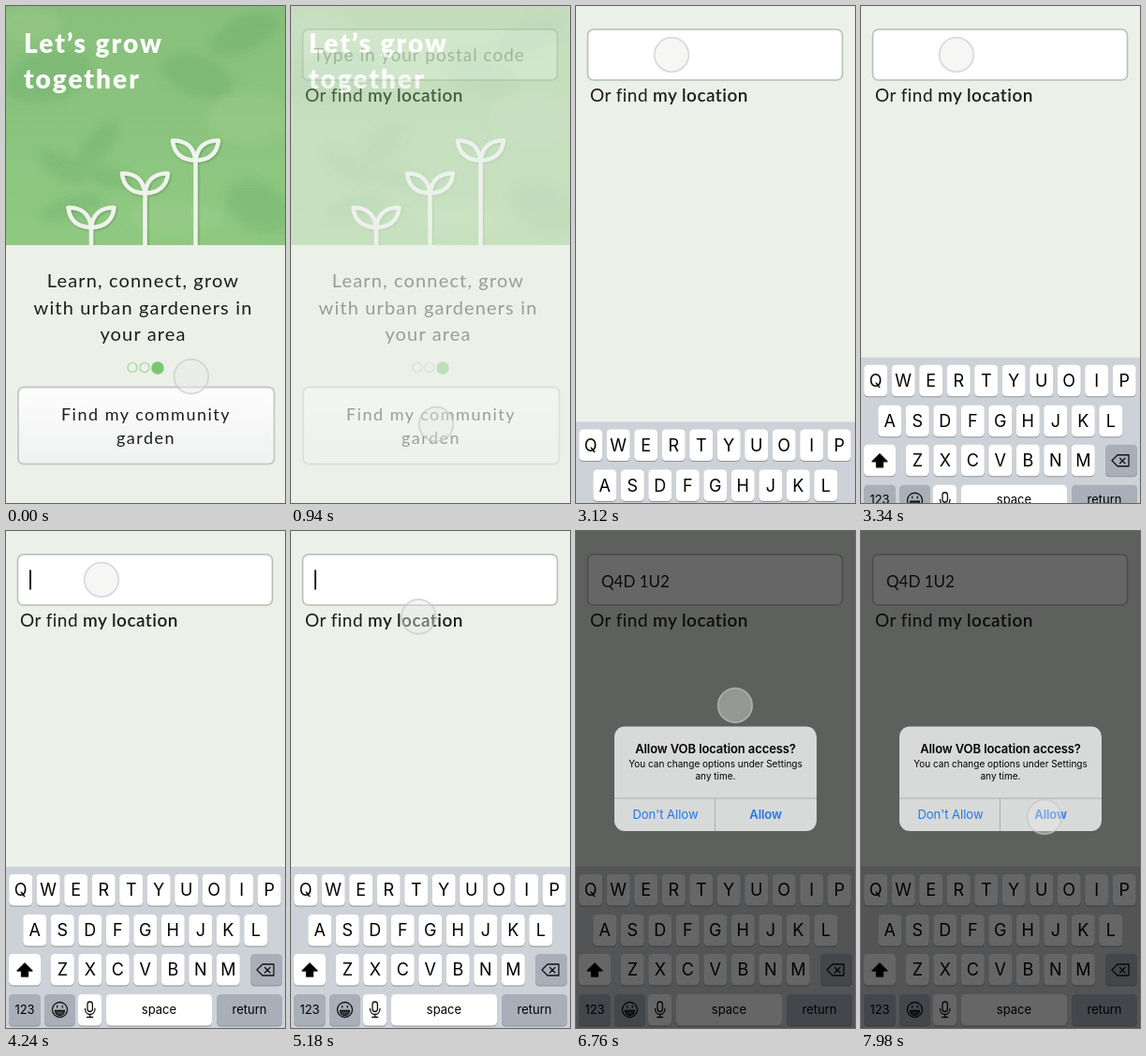
Write an HTML page that moves like this. It is 298 px wide and 530 px high and loops after 8 s.

```html
<!DOCTYPE html>
<html lang="en">
<head>
<meta charset="utf-8">
<title>Community garden finder</title>
<style>
  html, body { margin: 0; width: 100%; height: 100%; overflow: hidden; background: #ebf0e9; }
  svg { display: block; width: 298px; height: 530px; }
  text { font-family: Lato, "Open Sans", sans-serif; fill: #1c1e1c; white-space: pre; }
  .mid { text-anchor: middle; }
  .title { font-size: 28px; font-weight: 900; letter-spacing: 2px; fill: #fff; }
  .lead { font-size: 20px; letter-spacing: 1.15px; }
  .cta { font-size: 18px; letter-spacing: 1.5px; }
  .hint { font-size: 19px; letter-spacing: 1px; fill: #b1b4b1; }
  .find { font-size: 19px; letter-spacing: .45px; }
  .find tspan { font-weight: 600; }
  .code { font-size: 17px; }
  .ui text { font-family: Inter, "Liberation Sans", sans-serif; fill: #000; text-anchor: middle; }
  .key { font-size: 18px; }
  .small { font-size: 13px; }
  .bold { font-size: 13px; font-weight: 600; letter-spacing: -.1px; }
  .note { font-size: 10px; }
  .ui .blue { fill: #1f78ea; }
  .line { fill: none; stroke: #111; stroke-width: 1.3; stroke-linecap: round; stroke-linejoin: round; }
</style>
</head>
<body>
<svg viewBox="0 0 298 530">
  <defs>
    <linearGradient id="green" x2="0" y2="1">
      <stop offset="0" stop-color="#88bf7c"/><stop offset="1" stop-color="#8fc981"/>
    </linearGradient>
    <linearGradient id="button" x2="0" y2="1">
      <stop offset="0" stop-color="#fdfdfd"/><stop offset="1" stop-color="#f0f1f1"/>
    </linearGradient>
    <filter id="soft" x="-30%" y="-30%" width="160%" height="160%"><feGaussianBlur stdDeviation="5"/></filter>
    <filter id="lift" x="-20%" y="-20%" width="140%" height="140%">
      <feDropShadow dx="1" dy="1" stdDeviation="1.2" flood-color="#3c7a38" flood-opacity=".5"/>
    </filter>
    <clipPath id="hero"><path d="M0 0H298V255H0z"/></clipPath>
    <g id="sprout" fill="none" stroke="#eef3ec" stroke-width="4.600" stroke-linejoin="round">
      <path d="M0 0V110"/>
      <path d="M0 0C-2 -15 -10 -21 -24.500 -21C-23 -7 -14 0 0 0C14 0 23 -7 24.500 -21C10 -21 2 -15 0 0z"/>
    </g>
  </defs>

  <g id="search">
    <path d="M0 0H298V530H0z" fill="#ebf0e9"/>
    <rect id="field" x="12.500" y="25" width="272" height="54" rx="6" fill="#fff" stroke-width="1.600"/>
    <text id="hint" class="hint" x="23.500" y="59">Type in your postal code</text>
    <text id="code" class="code" x="27" y="60">Q4D 1U2</text>
    <path id="caret" d="M26 41.500V62.500" stroke="#222" stroke-width="2"/>
    <text class="find" x="15" y="102">Or find <tspan x="82">my location</tspan></text>
    <g id="keyboard" class="ui"><path d="M0 358H298V530H0z" fill="#cdd2d8"/></g>
  </g>

  <g id="welcome">
    <path d="M0 0H298V530H0z" fill="#ebf0e9"/>
    <g clip-path="url(#hero)">
      <path d="M0 0H298V255H0z" fill="url(#green)"/>
      <g id="leaves" filter="url(#soft)"></g>
      <g filter="url(#lift)">
        <use href="#sprout" x="91" y="236"/>
        <use href="#sprout" x="148.500" y="199.500"/>
        <use href="#sprout" x="202.500" y="164.500"/>
      </g>
    </g>
    <text class="title" x="19" y="50">Let’s grow</text>
    <text class="title" x="19" y="88">together</text>
    <g class="lead mid">
      <text x="146.500" y="300">Learn, connect, grow</text>
      <text x="146.500" y="329">with urban gardeners in</text>
      <text x="146.500" y="357">your area</text>
    </g>
    <g fill="none" stroke="#a3d69b" stroke-width="1.200">
      <circle cx="135" cy="385.500" r="5"/><circle cx="148" cy="385.500" r="5"/>
      <circle cx="162" cy="386" r="6.800" fill="#7cc576" stroke="none"/>
    </g>
    <rect x="13" y="406.500" width="273.500" height="82" rx="6" fill="url(#button)" stroke="#c5cac6" stroke-width="1.800"/>
    <g class="cta mid">
      <text x="149.500" y="442">Find my community</text>
      <text x="149.500" y="467">garden</text>
    </g>
  </g>

  <g id="modal" class="ui">
    <path d="M0 0H298V530H0z" opacity=".6"/>
    <rect x="41" y="208.500" width="216" height="111.500" rx="11" fill="#d8d9d9"/>
    <path d="M41 285H257M148.500 285V320" stroke="#adaeaf"/>
    <text class="bold" x="149" y="237">Allow VOB location access?</text>
    <text class="note" x="149" y="252">You can change options under Settings</text>
    <text class="note" x="149" y="265">any time.</text>
    <text class="small blue" x="95.500" y="307">Don't Allow</text>
    <text class="bold blue" x="202.500" y="307">Allow</text>
  </g>

  <circle id="touch" r="18.300" fill="rgba(232,233,231,.4)" stroke="rgba(195,198,195,.62)" stroke-width="1.800"/>
</svg>
<script>
const LOOP = 8000;
const $ = id => document.getElementById(id);

function add(parent, tag, attrs, content = '') {
  const el = document.createElementNS('http://www.w3.org/2000/svg', tag);
  for (const name in attrs) el.setAttribute(name, attrs[name]);
  el.textContent = content;
  parent.append(el);
  return el;
}

// Keyboard
const board = $('keyboard');

function key(x, y, w, label = '', grey = false, cls = 'key') {
  const box = { x, width: w, height: 33.5, rx: 4.5 };
  add(board, 'rect', { ...box, y: y + 1, fill: '#8e9297' });
  add(board, 'rect', { ...box, y, fill: grey ? '#a9afb8' : '#fff' });
  add(board, 'text', { x: x + w / 2, y: y + (cls === 'key' ? 23.3 : 20.5), class: cls }, label);
}

const rows = [['QWERTYUOIP', 3.2, 366], ['ASDFGHJKL', 18.3, 409], ['ZXCVBNM', 47.8, 451]];
for (const [letters, x, y] of rows) {
  [...letters].forEach((letter, i) => key(x + i * 29.5, y, 25, letter));
}
key(3, 451, 34);
key(261, 451, 34, '', true);
key(3, 494, 34, '123', true, 'small');
key(41, 494, 33, '', true);
key(77, 494, 25);
key(107, 494, 113, 'space', false, 'small');
key(225, 494, 70, 'return', true, 'small');

const icon = (d, style = '') => add(board, 'path', { d, style, class: 'line' });
icon('M20 461L28 469H23.5V475H16.5V469H12z', 'fill:#000');
icon('M274 462H286V474H274L268 468zM276.5 465.5L282 471M282 465.5L276.5 471');
add(board, 'circle', { cx: 57.5, cy: 510.5, r: 8, class: 'line' });
icon('M52.5 511.5H62.5C62 518 53 518 52.5 511.5z', 'fill:#444');
icon('M54.7 506.5V508M60.3 506.5V508');
add(board, 'rect', { x: 87, y: 502, width: 5.4, height: 10.5, rx: 2.7, class: 'line' });
icon('M84.5 509.5C84.5 517.5 95 517.5 95 509.5M89.7 515.5V518.5M86.7 518.5H92.7');

// Soft foliage behind the heading: x, y, rx, ry, turn
function leaf([cx, cy, rx, ry, turn = 0], fill) {
  const transform = `rotate(${turn} ${cx} ${cy})`;
  add($('leaves'), 'ellipse', { cx, cy, rx, ry, fill, transform, opacity: .18 });
}
[
  [45, 75, 48, 27, -15], [62, 172, 30, 12, 35], [98, 148, 30, 13, -50], [112, 183, 26, 11, 15],
  [70, 215, 34, 12, -15], [205, 75, 40, 22, 20], [255, 30, 40, 18, -25], [270, 215, 38, 25, 30]
].forEach(shape => leaf(shape, '#4f9552'));
[[260, 120, 45, 28], [25, 20, 35, 18], [180, 225, 50, 18]].forEach(shape => leaf(shape, '#b5d8a0'));

// Timing
const ramp = (t, from, to) => Math.min(1, Math.max(0, (t - from) / (to - from)));
const smooth = u => u * u * (3 - 2 * u);
const cubic = u => u < .5 ? 4 * u ** 3 : 1 - 4 * (1 - u) ** 3;
const out = u => 1 - (1 - u) ** 2.4;
const curve = (u, a, b, c) => (1 - u) ** 2 * a + 2 * u * (1 - u) * b + u * u * c;

// Cubic-bezier easing with handles (x1, 0) and (x2, 1)
function bezier(x, x1, x2) {
  let lo = 0, hi = 1;
  for (let i = 0; i < 24; i++) {
    const s = (lo + hi) / 2;
    const px = 3 * (1 - s) ** 2 * s * x1 + 3 * (1 - s) * s * s * x2 + s ** 3;
    if (px < x) lo = s; else hi = s;
  }
  return smooth(lo);
}

const moves = [
  { from: 0, to: 820, ease: out, path: [[198, 395], [174, 425], [155, 446]] },
  { from: 1710, to: 2465, ease: cubic, path: [[155, 446], [150, 194], [102, 52]] },
  { from: 4520, to: 5340, ease: smooth, path: [[102, 52], [121, 72], [140, 96]] },
  { from: 6100, to: 7560, ease: smooth, path: [[140, 96], [180, 201], [196, 305]] }
];

function touchAt(t) {
  const move = moves.filter(m => t >= m.from).pop();
  const u = move.ease(ramp(t, move.from, move.to));
  return [0, 1].map(i => curve(u, ...move.path.map(p => p[i])));
}

function draw(t) {
  const [x, y] = touchAt(t);
  const typed = t >= 5360;
  const focus = ramp(t, 2790, 2980);
  const rise = bezier(ramp(t, 2800, 3610), .45, .27);
  const shade = 202 - 20 * focus;

  $('touch').setAttribute('transform', `translate(${x} ${y})`);
  $('welcome').style.opacity = 1 - ramp(t, 820, 1020);
  $('field').style.stroke = `rgb(${shade},${shade + 9},${shade})`;
  $('hint').style.opacity = 1 - focus;
  $('keyboard').setAttribute('transform', `translate(0 ${172 * (1 - rise)})`);
  $('caret').style.opacity = typed ? 0 : ramp(t, 3600, 3720);
  $('code').style.opacity = typed ? 1 : 0;
  $('modal').style.opacity = smooth(ramp(t, 5340, 5580));
}

function tick() {
  draw(performance.now() % LOOP);
  requestAnimationFrame(tick);
}
tick();
</script>
</body>
</html>
```
